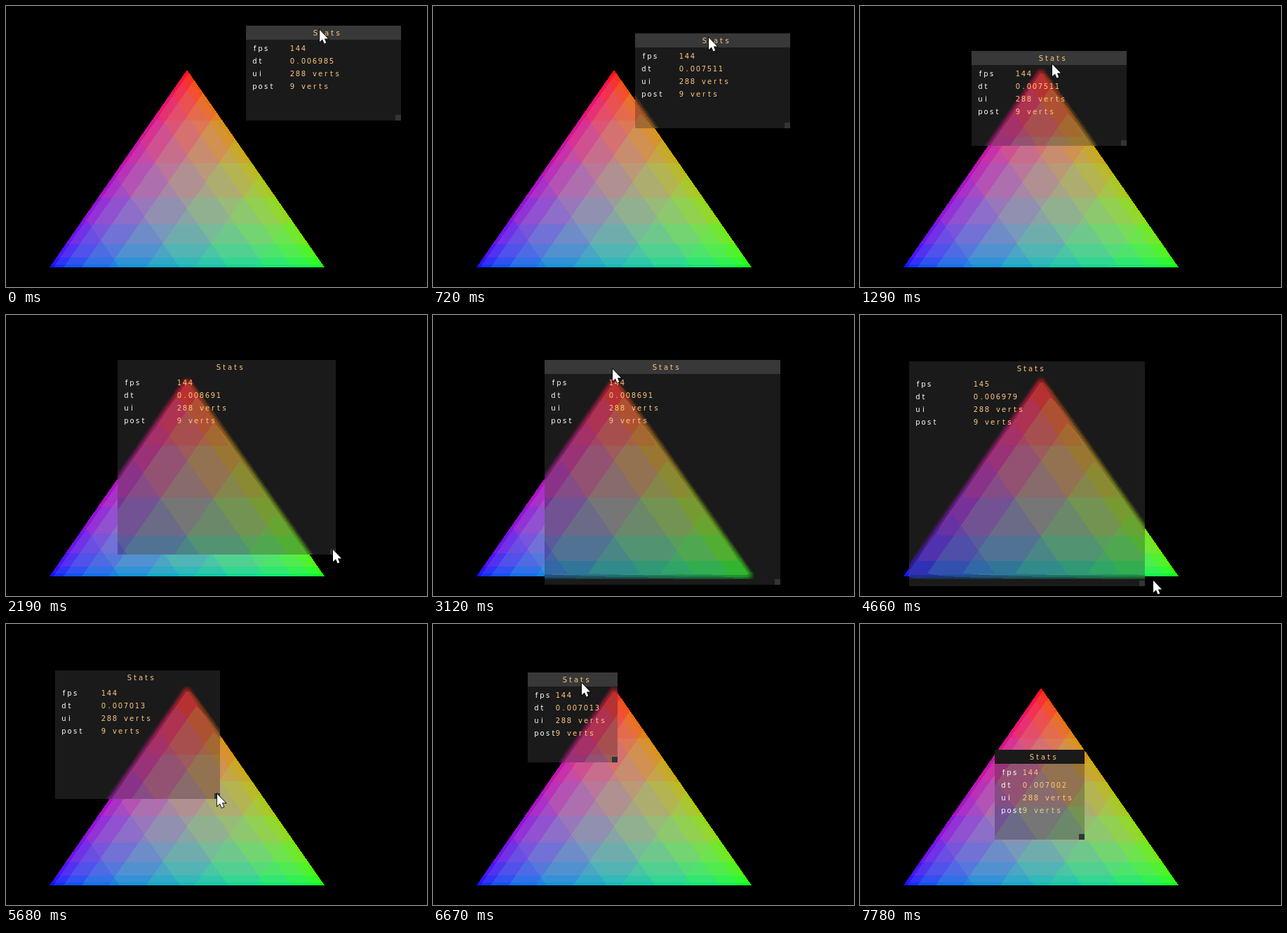
Animation, 600 px wide and 400 px high, one loop 7.96 s. Source, as an HTML page with a canvas:

```html
<!DOCTYPE html>
<html lang="en">
<head>
<meta charset="utf-8">
<title>Stats panel</title>
<style>
  html, body { margin: 0; width: 100%; height: 100%; overflow: hidden; background: #000; }
  canvas, svg { position: absolute; left: 0; top: 0; width: 600px; height: 400px; }
  text { font: 10px "DejaVu Sans", sans-serif; text-anchor: middle; fill: #fff; }
  .warm { fill: #ffc880; }
</style>
</head>
<body>
<canvas id="scene" width="600" height="400"></canvas>
<canvas id="panel" width="600" height="400"></canvas>
<svg id="ui" viewBox="0 0 600 400" width="600" height="400">
  <rect id="bar" height="20"/>
  <rect id="grip" width="8" height="8" fill="#343434"/>
  <g id="texts"></g>
  <path id="cursor" d="M0 0V17L4 13.5L6.5 19.5L9.3 18.3L6.9 12.6H12Z"
    fill="#fff" stroke="#000" stroke-width="1.6" paint-order="stroke"/>
</svg>
<script>
const W = 600, H = 400, LOOP = 7960, MIN_SIZE = 128;
const $ = id => document.getElementById(id);
const set = (el, attrs) => { for (const k in attrs) el.setAttribute(k, attrs[k]); };

// The pointer's script: each step names the time and place where it ends
const steps = [{ t: 0, pos: [447, 34] }];
const last = () => steps[steps.length - 1];
const step = act => (t, x, y) => steps.push({ t, pos: [x, y], act });
const move = step('move'), drag = step('drag'), resize = step('resize');
const rest = t => move(t, ...last().pos);

rest(20);
move(80, 447, 27);
rest(200);
move(300, 447, 34);
rest(450);
drag(1200, 264, 70);
rest(1250);
move(1290, 274, 83);
move(1560, 376, 192);
resize(2640, 491, 377);
rest(2700);
move(3080, 256, 77);
rest(3120);
move(3160, 259, 80);
drag(3400, 330, 77);
drag(3650, 388, 84);
rest(3790);
drag(4020, 322, 82);
drag(4250, 170, 82);
move(4660, 418, 378);
move(4780, 402, 379);
rest(4820);
resize(5415, 380, 284);
resize(5960, 190, 184);
move(6160, 147, 81);
rest(6220);
drag(6420, 160, 74);
drag(6670, 212, 84);
drag(6980, 370, 170);
drag(7290, 269, 194);
rest(7320);
move(7490, 490, 360);

// Time, frames per second, frame time in microseconds
const readings = [
  [0, 144, 6985], [580, 144, 7511], [1780, 144, 8691], [3580, 143, 6983],
  [4180, 145, 6979], [4780, 144, 7013], [7780, 144, 7002]
];

// Monotone cubic: passes through each step without overshoot
function slope(i, k) {
  if (i < 1 || i >= steps.length - 1) return 0;
  const rate = j => (steps[j + 1].pos[k] - steps[j].pos[k]) / (steps[j + 1].t - steps[j].t);
  const a = rate(i - 1), b = rate(i);
  return a * b <= 0 ? 0 : 2 * a * b / (a + b);
}
function between(i, t) {
  const p = steps[i - 1], q = steps[i], d = q.t - p.t;
  const u = Math.min(1, (t - p.t) / d), v = 1 - u;
  return [0, 1].map(k =>
    p.pos[k] * v * v * (1 + 2 * u) + q.pos[k] * u * u * (3 - 2 * u) +
    d * u * v * (slope(i - 1, k) * v - slope(i, k) * u));
}

// Replays the script up to time t
function stateAt(t) {
  let mouse = steps[0].pos, corner = [342, 28], size = [221, 135];
  for (let i = 1; i < steps.length && steps[i - 1].t < t; i++) {
    const next = between(i, t), by = next.map((v, k) => v - mouse[k]);
    if (steps[i].act === 'drag') corner = corner.map((v, k) => v + by[k]);
    if (steps[i].act === 'resize') size = size.map((v, k) => Math.max(MIN_SIZE, v + by[k]));
    mouse = next;
  }
  return [mouse, corner, size].map(pair => pair.map(Math.round));
}

// Linear light, three values per pixel
function triangle() {
  const light = new Float32Array(W * H * 3);
  for (let y = 0, n = 0; y < H; y++) {
    for (let x = 0; x < W; x++, n += 3) {
      const r = (372 - y - .5) / 281, g = (x + .5 - 62 - 196 * r) / 392, b = 1 - r - g;
      if (Math.min(r, g, b) >= 0) light.set([r, g, b], n);
    }
  }
  return light;
}
function boxBlur(src, stride) {
  return src.map((_, i) => {
    let sum = 0;
    for (let k = -4; k <= 4; k++) sum += src[i + k * stride] || 0;
    return sum / 9;
  });
}

// Paints with few colours: each block of 32 levels becomes its mean colour
function paint(id, light) {
  const ctx = $(id).getContext('2d'), img = ctx.createImageData(W, H), blocks = new Map();
  const levels = light.map(v =>
    255 * (v <= 0.0031308 ? 12.92 * v : 1.055 * v ** (1 / 2.4) - 0.055));
  const owner = [];
  for (let n = 0; n < levels.length; n += 3) {
    const rgb = levels.subarray(n, n + 3);
    const key = (rgb[0] >> 5) << 6 | (rgb[1] >> 5) << 3 | rgb[2] >> 5;
    if (!blocks.has(key)) blocks.set(key, { sum: [0, 0, 0], count: 0 });
    const block = blocks.get(key);
    for (let k = 0; k < 3; k++) block.sum[k] += rgb[k];
    block.count++;
    owner.push(block);
  }
  owner.forEach(({ sum, count }, i) => {
    for (let k = 0; k < 3; k++) img.data[4 * i + k] = sum[k] / count;
    img.data[4 * i + 3] = 255;
  });
  ctx.putImageData(img, 0, 0);
}

function addText(cls) {
  const el = document.createElementNS('http://www.w3.org/2000/svg', 'text');
  el.setAttribute('class', cls);
  return $('texts').appendChild(el);
}
const title = addText('warm');
const names = ['fps', 'dt', 'ui', 'post'];
const rows = names.map(() => [addText('name'), addText('warm')]);

// Each character is centred in an 8 px cell
function write(el, str, x, y) {
  if (el.textContent !== str) el.textContent = str;
  set(el, { x: [...str].map((c, i) => x + 8 * i).join(' '), y });
}

function draw(t) {
  const [[mx, my], [x, y], [w, h]] = stateAt(t);
  const shown = t < last().t;
  const hover = shown && mx >= x && mx < x + w && my >= y && my < y + 20;

  $('panel').style.clipPath = `inset(${y}px ${W - x - w}px ${H - y - h}px ${x}px)`;
  set($('bar'), { x, y, width: w, fill: hover ? '#383838' : '#1a1a1a' });
  set($('grip'), { x: x + w - 8, y: y + h - 8 });

  const [, fps, dt] = readings.filter(r => r[0] <= t).pop();
  const values = [`${fps}`, (dt / 1e6).toFixed(6), '288 verts', '9 verts'];
  write(title, 'Stats', x + Math.floor(w / 2) - 11, y + 14);
  rows.forEach(([name, value], k) => {
    write(name, names[k], x + 12.5, y + 36 + 18 * k);
    write(value, values[k], x + Math.floor(w / 4) + 11, y + 36 + 18 * k);
  });

  set($('cursor'), {
    transform: `translate(${mx} ${my})`,
    visibility: shown ? 'visible' : 'hidden'
  });
}

const light = triangle();
paint('scene', light);
paint('panel', boxBlur(boxBlur(light, 3), 3 * W).map(v => .515 * v + .0103));
draw(0);
const begin = performance.now();
function tick() {
  draw((performance.now() - begin) % LOOP);
  requestAnimationFrame(tick);
}
requestAnimationFrame(tick);
</script>
</body>
</html>
```
